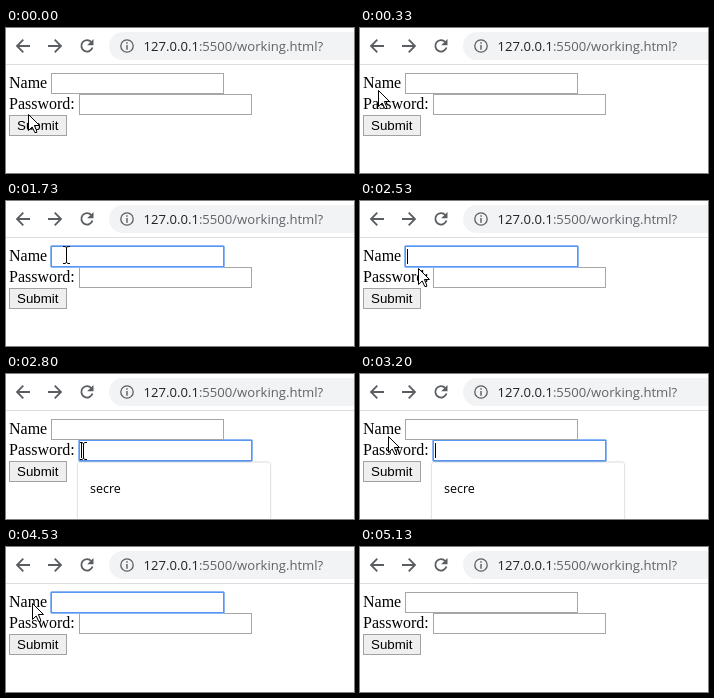
These frames come from a looping animation (348x145 px, 5.27 s). An HTML page:

```html
<!DOCTYPE html>
<html lang="en">
<head>
<meta charset="utf-8">
<title>Form labels</title>
<style>
  html, body { margin: 0; width: 100%; height: 100%; overflow: hidden; background: #fff; }
  svg { display: block; }
  .url { font: 13.1px "Open Sans", "Noto Sans", sans-serif; fill: #202124; }
  .path { fill: #5f6368; }
  .label { font: 16px "Liberation Serif", "Times New Roman", serif; }
  .button-text { font: 13.333px "Liberation Sans", Arial, sans-serif; }
  .option { font: 12.5px "Open Sans", "Noto Sans", sans-serif; }
  .icon { fill: none; stroke: #5a5d61; stroke-width: 1.8; }
  .field .edge { fill: #fff; stroke: #a6a6a6; }
  .field .ring { fill: none; stroke: #8db8f7; visibility: hidden; }
  .field.focus .edge { stroke: #5596f0; }
  .field.focus .ring { visibility: visible; }
  .button { fill: #efefef; stroke: #a2a2a2; }
  .button.hover { fill: #e6e6e6; stroke: #8a8a8a; }
  #menu rect { fill: #fff; filter: drop-shadow(0 0 1px rgba(0, 0, 0, .3)); }
</style>
</head>
<body>
<svg width="348" height="145" viewBox="0 0 348 145">
  <g id="toolbar">
    <path d="M0 36.5H348" stroke="#dcdde0"/>
    <path class="icon" d="M24 18H11.5M17.3 11.7L11 18l6.3 6.3"/>
    <path class="icon" d="M42 18H54.500M48.700 11.7L55 18l-6.300 6.300"/>
    <path class="icon" d="M85.300 14A5.700 5.700 0 1 0 86.500 19.500"/>
    <path d="M87.500 11v6.300h-6.300z" fill="#5a5d61"/>
    <rect x="103" y="4" width="280" height="28" rx="14" fill="#f1f3f4"/>
    <circle class="icon" cx="121" cy="18" r="6.200" style="stroke-width:1.300"/>
    <path class="icon" d="M121 14.200v1.500M121 17v4.700" style="stroke-width:1.400"/>
    <text class="url" x="137.500" y="23">127.0.0.1<tspan class="path">:5500/working.html?</tspan></text>
  </g>

  <text class="label" x="3" y="60">Name</text>
  <text class="label" x="3" y="81">Password:</text>

  <g class="field" id="password" transform="translate(73 66)">
    <rect class="ring" x="-.5" y="-.5" width="174" height="22" rx="1.500"/>
    <rect class="edge" x=".5" y=".5" width="172" height="20"/>
    <rect class="caret" x="2" y="3" width="1" height="15"/>
  </g>
  <g class="field" id="name" transform="translate(45 45)">
    <rect class="ring" x="-.5" y="-.5" width="174" height="22" rx="1.500"/>
    <rect class="edge" x=".5" y=".5" width="172" height="20"/>
    <rect class="caret" x="2" y="3" width="1" height="15"/>
  </g>

  <rect class="button" id="submit" x="3.500" y="87.500" width="57" height="20"/>
  <text class="button-text" x="11" y="102">Submit</text>

  <g id="menu">
    <rect x="72" y="88.500" width="192" height="80" rx="2"/>
    <text class="option" x="84" y="119">secre</text>
  </g>

  <path id="arrow" d="M.5.5V16.500L4.200 13L6.800 18.500H8.700V17L6.400 11.500H11.500Z" fill="#fff" stroke="#000"/>
  <path id="beam" d="M-3 -8.500H-1L.5 -7.500L2 -8.500H4M.5 -7.500V7.500M-3 8.500H-1L.5 7.500L2 8.500H4" fill="none" stroke="#000"/>
</svg>
<script>
const LOOP = 5270;
const BLINK = 8;
const $ = id => document.getElementById(id);

// Pointer path: tick (1/15 s), x, y
const path = [
  [0, 22, 86], [5, 18, 62], [8, 25, 54], [9, 25, 53], [21, 25, 53],
  [26, 60, 54], [32, 60, 54], [38, 58, 67], [39, 66, 67], [40, 77, 77],
  [44, 77, 77], [45, 69, 71], [48, 28, 62], [50, 26, 58], [51, 26, 58],
  [52, 26, 56], [68, 26, 56], [70, 29, 66], [71, 36, 86], [72, 49, 104],
  [73, 85, 138], [74, 100, 160], [79, 100, 160]
];

// Focus periods, with the tick at which the caret starts blinking
const focuses = [
  { id: "name", from: 18, to: 41, blink: 18 },
  { id: "password", from: 41, to: 60, blink: 42 },
  { id: "name", from: 60, to: 77, blink: 60 }
];

function pointerAt(tick) {
  const i = path.findIndex(p => p[0] > tick);
  const [t0, x0, y0] = path[i - 1], [t1, x1, y1] = path[i];
  const k = (tick - t0) / (t1 - t0);
  return [Math.round(x0 + (x1 - x0) * k), Math.round(y0 + (y1 - y0) * k)];
}

const inside = (x, y, left, top, width) =>
  x >= left && x < left + width && y >= top && y < top + 21;

const show = (el, on) => { el.style.visibility = on ? "visible" : "hidden"; };

function draw(ms) {
  const tick = Math.floor((Math.floor(ms / 10) + 0.34) * 0.15);
  const [x, y] = pointerAt(tick);
  const overField = inside(x, y, 45, 45, 173) || inside(x, y, 73, 66, 173);
  for (const id of ["arrow", "beam"]) {
    $(id).setAttribute("transform", `translate(${x} ${y})`);
    show($(id), (id === "beam") === overField);
  }
  $("submit").classList.toggle("hover", inside(x, y, 3, 87, 58));

  const focus = focuses.find(f => tick >= f.from && tick < f.to);
  const lit = focus && Math.floor(Math.max(0, tick - focus.blink) / BLINK) % 2 === 0;
  for (const id of ["name", "password"]) {
    const active = !!focus && focus.id === id;
    $(id).classList.toggle("focus", active);
    show($(id).querySelector(".caret"), active && lit);
  }
  show($("menu"), tick >= 42 && tick < 60);
}

const start = performance.now();
function loop() {
  draw((performance.now() - start) % LOOP);
  requestAnimationFrame(loop);
}
loop();
</script>
</body>
</html>
```
